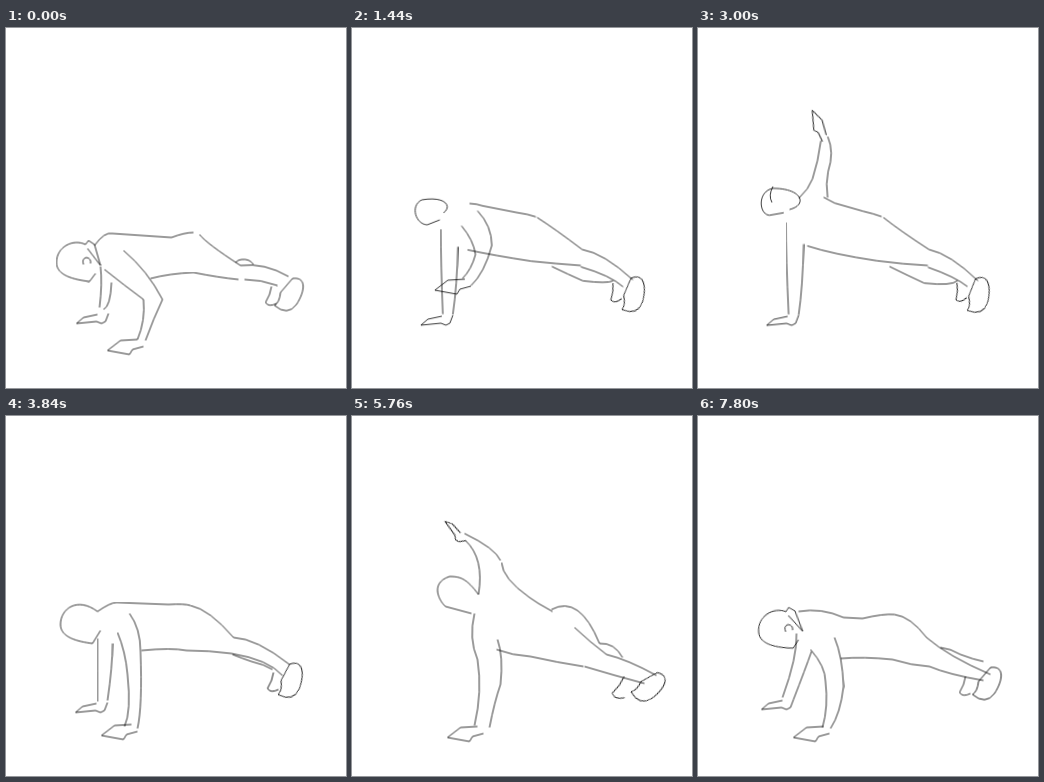
Recreate the animation shown at these times as an HTML page without scripts. Size 340x360 px, loop 8040 ms.

```html
<!DOCTYPE html>
<html lang="en">
<head>
<meta charset="utf-8">
<title>Push-up with rotation</title>
<style>
html, body { margin: 0; width: 100%; height: 100%; overflow: hidden; background: #fff; }
svg { display: block; width: 100%; height: 100%; }
path {
  fill: none; stroke: #000; stroke-width: .8;
  stroke-linejoin: round; vector-effect: non-scaling-stroke;
}

/* Poses: A half way, L low, B rising, P plank, M lifting, S side plank,
   G swinging out, T other side, U other arm up, E return.
   Upper case holds a curve, lower case a placement. */
.pose {
  --L: var(--A); --B: var(--A); --E: var(--A);
  --M: var(--S); --G: var(--T); --U: var(--T);
  --m: var(--s); --g: var(--t); --u: var(--t);
  animation: pose 8040ms steps(2) infinite;
}

/* Rigid parts: one shape each, moved and turned. */
.head {
  --A: path("M10,-17C-2,-23 -19,-15 -19,1C-19,14 -2,18 14,20L20,12");
  --P: path("M18,-12C-2,-27 -19,-15 -19,1C-19,14 -2,18 13,20L21,7");
  --S: path("M6,12C30,9 26,-12 -8,-14C-26,-12 -26,14 -16,14L-1,13");
  --T: path("M20,0C8,-16 2,-18 -9,-18C-30,-11 -18,8 -13,12L13,19");
  --a: translate(69px, 233px);
  --l: translate(59px, 278px);
  --b: translate(65px, 243px) rotate(5deg);
  --p: translate(73px, 207px);
  --s: translate(85px, 167px);
  --t: translate(106px, 178px);
  --e: translate(79px, 213px) rotate(-5deg);
}
.near-hand {
  --a: translate(134px, 314px);
  --l: var(--a);
  --b: var(--a);
  --p: translate(128px, 311px);
  --m: translate(109px, 225px);
  --s: translate(126px, 81px) rotate(88deg) scale(.9, .7);
  --t: translate(128px, 313px);
  --e: var(--t);
}
.far-hand {
  --a: translate(97px, 284px);
  --l: translate(93px, 294px) scale(.6, .05);
  --b: translate(95px, 286px);
  --p: translate(96px, 285px);
  --s: translate(95px, 286px);
  --g: translate(76px, 200px);
  --t: translate(112px, 120px) rotate(60deg) scale(.85);
  --u: translate(131px, 76px) rotate(100deg);
  --e: translate(90px, 282px);
}
.near-foot {
  --a: translate(283px, 267px);
  --l: translate(280px, 267px);
  --b: translate(279px, 266px);
  --p: translate(284px, 265px) rotate(-13deg);
  --s: translate(279px, 268px) rotate(-20deg);
  --t: translate(296px, 271px) rotate(20deg);
  --e: translate(289px, 268px);
}
.far-foot {
  --a: translate(264px, 266px);
  --l: translate(265px, 267px);
  --b: translate(264px, 269px);
  --p: translate(266px, 264px);
  --s: translate(259px, 262px) rotate(-20deg);
  --t: translate(268px, 269px) rotate(15deg) scale(1.2);
  --e: translate(266px, 268px);
}

/* Soft parts: a few key points each, bent between poses. */
.back {
  --A: path("M88,217Q98,203 106,205L165,209Q178,204 187,204");
  --L: path("M81,253Q90,243 97,242L159,244Q173,235 182,237");
  --B: path("M75,230Q82,220 90,219L150,223Q164,216 173,217");
  --P: path("M91,195Q104,186 110,186L162,188Q178,187 184,189");
  --S: path("M130,165Q135,170 140,173L165,182Q175,185 183,188");
  --T: path("M149,146Q150,162 177,181L186,187Q193,191 200,195");
  --E: path("M100,195Q123,191 145,201L164,202Q185,197 196,198");
}
.belly {
  --A: path("M144,250Q163,245 187,244Q212,249 232,251M238,251Q254,251 271,257");
  --L: path("M153,283Q166,278 180,277Q210,272 233,266M239,264Q252,261 273,262");
  --B: path("M154,261Q168,258 180,258Q205,260 227,259M229,258Q253,256 270,262");
  --P: path("M135,234Q165,231 180,234Q203,234 225,237M225,237Q262,243 276,259");
  --S: path("M105,215Q130,225 178,232Q205,236 230,237M230,239Q256,249 268,258");
  --T: path("M144,233Q160,239 178,240Q205,246 231,250M232,250Q262,259 292,267");
  --E: path("M142,242Q165,240 194,243Q213,249 231,250M231,250Q250,258 285,264");
}
.near-leg {
  --A: path("M193,206Q200,215 234,237Q258,234 282,248");
  --L: path("M183,237Q196,244 231,250Q252,243 283,249");
  --B: path("M176,218Q195,230 225,243Q247,240 281,250");
  --P: path("M184,189Q203,193 227,221Q250,222 283,248");
  --S: path("M185,189Q202,204 231,221Q252,226 279,253");
  --T: path("M222,211Q238,226 254,238Q275,243 304,259");
  --E: path("M196,198Q212,200 228,221Q250,240 292,258");
}
.far-leg {
  --A: path("M229,234Q232,231 235,231Q243,230 247,236");
  --L: path("M222,245Q229,241 234,241Q240,242 245,245");
  --B: path("M215,239Q226,234 237,237Q258,244 274,246");
  --P: path("M226,238Q236,242 245,245Q258,248 266,253");
  --S: path("M186,238Q206,248 223,256Q253,259 258,252");
  --T: path("M199,193Q227,178 247,227Q262,226 270,241");
  --E: path("M242,231Q252,232 262,238Q275,243 285,245");
}
.near-arm {
  --A: path("M117,222Q141,242 156,271Q147,290 139,312M98,241Q118,257 137,271Q139,292 131,311");
  --L: path("M94,266Q142,262 155,270Q153,292 137,316M97,293Q120,289 139,285Q139,296 131,311");
  --B: path("M109,235Q156,260 155,272Q152,293 137,313M87,259Q112,266 135,278Q138,292 131,311");
  --P: path("M123,197Q134,212 134,235Q136,290 131,312M111,216Q119,235 121,258Q125,295 118,310");
  --M: path("M126,175Q142,190 142,208Q130,222 112,230M108,188Q122,200 124,210Q116,214 106,220");
  --S: path("M130,165Q126,147 129,130Q136,100 129,79M99,163Q109,150 113,135Q119,110 123,84");
  --T: path("M145,223Q151,240 148,268Q142,285 137,311M122,197Q116,222 125,243Q130,275 122,309");
  --E: path("M136,221Q144,240 145,270Q142,297 132,312M112,233Q127,250 127,265Q130,290 124,311");
}
.far-arm {
  --A: path("M94,238Q96,255 93,279M105,254Q104,278 97,281");
  --L: path("M90,294Q90,294 90,294M93,295Q93,295 93,295");
  --B: path("M88,255Q91,270 89,286M103,266Q100,277 100,287");
  --P: path("M91,222Q91,255 91,285M106,227Q106,250 101,284");
  --S: path("M87,190Q87,225 90,286M105,214Q104,260 100,287");
  --G: path("M118,190Q98,194 78,206M140,165Q105,180 75,195");
  --T: path("M126,178Q132,142 113,124M148,144Q143,132 112,117");
  --U: path("M126,178Q119,140 125,78M148,144Q138,115 136,78");
  --E: path("M98,217Q99,240 84,281M113,235Q107,252 95,283");
}
.face { animation: face 8040ms step-end infinite; }
.seam { animation: seam 8040ms step-end infinite; }

/* Every step lasts 120 ms. */
@keyframes pose {
  0% { d: var(--A); transform: var(--a); animation-timing-function: steps(4); }
  5.97%, 8.955% { d: var(--L); transform: var(--l); }
  11.94% { d: var(--B); transform: var(--b); }
  14.925% { d: var(--P); transform: var(--p); animation-timing-function: steps(3); }
  19.402% { d: var(--M); transform: var(--m); animation-timing-function: steps(4); }
  25.373%, 35.82% { d: var(--S); transform: var(--s); animation-timing-function: steps(8); }
  47.761% { d: var(--P); transform: var(--p); animation-timing-function: steps(3); }
  52.238% { d: var(--B); transform: var(--b); animation-timing-function: steps(3); }
  56.716%, 59.701% { d: var(--L); transform: var(--l); }
  62.686% { d: var(--B); transform: var(--b); }
  65.671% { d: var(--E); transform: var(--e); }
  68.656% { d: var(--G); transform: var(--g); }
  71.641% { d: var(--T); transform: var(--t); animation-timing-function: steps(4); }
  77.611%, 83.582% { d: var(--U); transform: var(--u); animation-timing-function: steps(4); }
  89.552% { d: var(--T); transform: var(--t); animation-timing-function: steps(3); }
  94.029% { d: var(--G); transform: var(--g); }
  97.014%, 100% { d: var(--E); transform: var(--e); }
}
@keyframes face {
  0%, 50%, 95.5% { visibility: visible; }
  14.9%, 67% { visibility: hidden; }
}
@keyframes seam {
  0%, 40% { visibility: hidden; }
  19.4% { visibility: visible; }
}
</style>
</head>
<body>
<svg viewBox="-.5 -.5 340 360">
  <path class="pose far-arm"/>
  <g class="pose far-hand"><path d="M5,1L2,9 -2,11 -7,9 -27,11 -20,5 -6,2"/></g>
  <path class="pose far-leg"/>
  <g class="pose far-foot"><path d="M1,-8Q0,0 -5,8Q-2,13 6,9"/></g>
  <path class="pose back"/>
  <path class="pose belly"/>
  <path class="pose near-leg"/>
  <g class="pose near-foot"><path d="M3,-17C17,-19 16,-5 7,9Q-2,21 -15,10Q-10,7 -9,-3Z"/></g>
  <path class="pose head"/>
  <g class="pose head">
    <path class="face" d="M10,-17L13,-21 19,-17 25,4 12,-13M8,3Q6,-3 11,-4Q16,-3 15,2"/>
    <path class="seam" d="M-9,-14Q-14,-5 -10,2"/>
  </g>
  <path class="pose near-arm"/>
  <g class="pose near-hand"><path d="M3,4L-8,7 -11,12 -33,8 -20,-2 -3,-3"/></g>
</svg>
</body>
</html>
```
